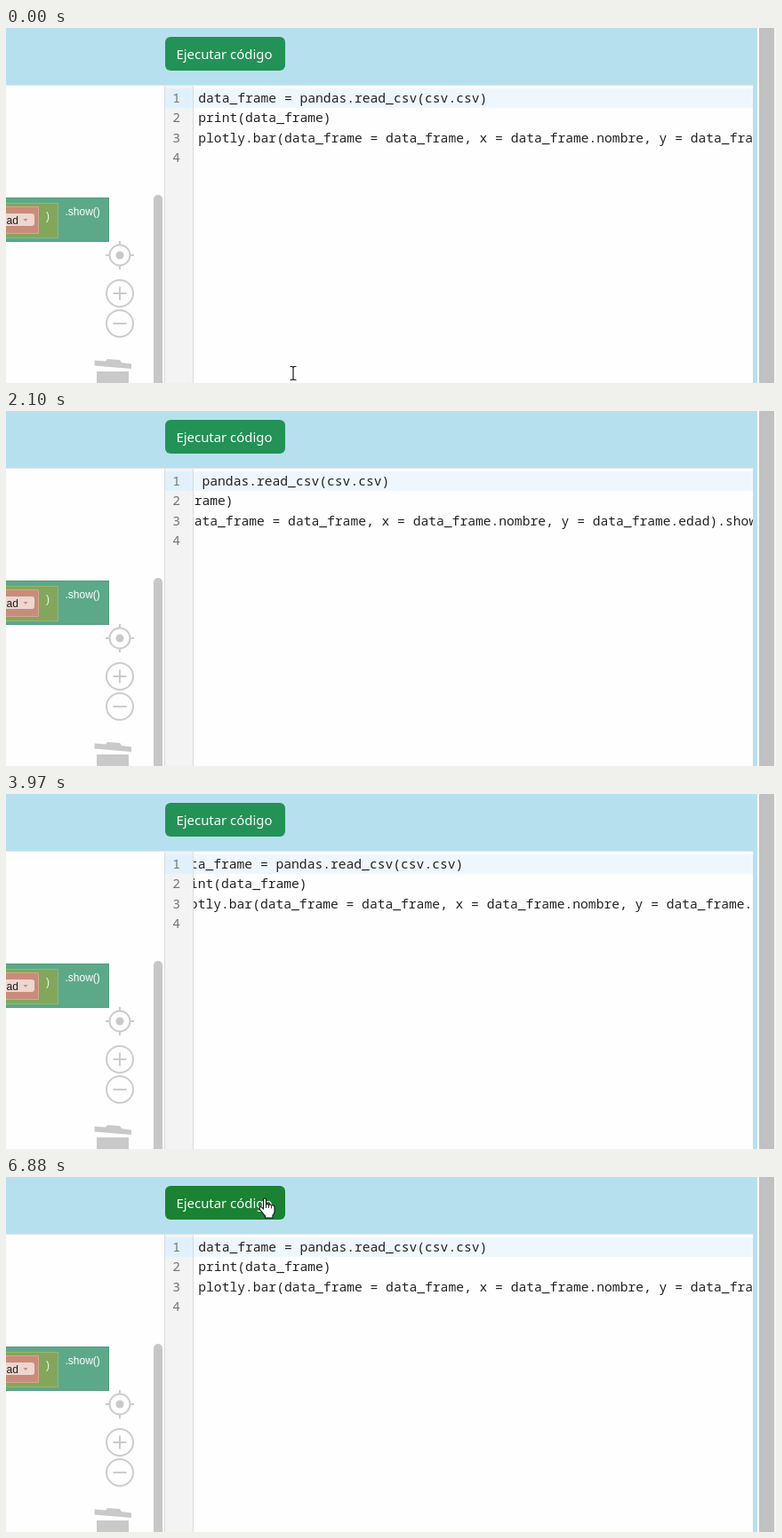
Write an HTML page that moves like this. It is 866 px wide and 400 px high and loops after 6910 ms.

```html
<!DOCTYPE html>
<html lang="es">
<head>
<meta charset="utf-8">
<title>Ejecutar código</title>
<style>
  html, body { margin: 0; width: 100%; height: 100%; overflow: hidden; background: #fefefe; }
  svg { display: block; }
  text { white-space: pre; }
  .code { font: 14.65px "Noto Sans Mono", "DejaVu Sans Mono", monospace; fill: #222; }
  .nums { fill: #757575; text-anchor: end; }
  .label { font: 14.9px "Noto Sans", "Open Sans", sans-serif; fill: #fff; }
  .block { font: 12px "Liberation Sans", Arial, sans-serif; }
  .icon { fill: none; stroke: #ccc; stroke-width: 2; }
  .solid { fill: #c9c9c9; }
</style>
</head>
<body>
<svg width="866" height="400" viewBox="0 0 866 400">
  <defs>
    <clipPath id="editor"><rect x="211" y="65" width="629" height="335"/></clipPath>
  </defs>

  <!-- page -->
  <rect width="866" height="400" fill="#fefefe"/>
  <rect width="845" height="64" fill="#b7e0ee"/>
  <rect x="840" y="64" width="5" height="336" fill="#b7e0ee"/>
  <rect y="64" width="840" height="1" fill="#dde6e8"/>
  <rect x="847" width="17" height="400" fill="#c1c1c1"/>
  <rect x="864" width="2" height="400" fill="#f6f6f6"/>

  <!-- block workspace -->
  <g class="block">
    <path d="M0 191H116V241H0Z" fill="#5ca98a"/>
    <path d="M0 191.5H115.5V240.5H0" fill="none" stroke="#539a7c"/>
    <path d="M0 197.5H58.5V236.5H0" fill="#82a75b" stroke="#98b574"/>
    <path d="M0 201.5H36.5V231.5H0" fill="#c98c7a" stroke="#d8a593"/>
    <path d="M0 209H29a3 3 0 0 1 3 3V220a3 3 0 0 1-3 3H0Z" fill="#ecd6d0"/>
    <text x="0.5" y="220.5" fill="#1c1c1c">ad</text>
    <path d="M19.5 215h5l-2.5 3z" fill="#c98c7a"/>
    <text x="45" y="216" fill="#f4f6e4">)</text>
    <text x="66.5" y="211" fill="#fff">.show()</text>
  </g>
  <g class="icon">
    <circle cx="128" cy="256" r="11.5"/>
    <path d="M128 240v5M128 267v5M112 256h5M139 256h5"/>
    <circle cx="128" cy="299" r="15"/>
    <path d="M120.5 299h15M128 291.5v15"/>
    <circle cx="128" cy="333" r="15"/>
    <path d="M120.5 333h15"/>
  </g>
  <g class="solid">
    <circle cx="128" cy="256" r="4.5"/>
    <path d="M99.5 374.5L112 375.5L114 373L128 374L130 377L141 378.5V384L99.5 380.5Z"/>
    <rect x="102" y="387" width="36" height="13"/>
    <rect x="166" y="188" width="10" height="230" rx="5" fill="#c7c7c7"/>
  </g>

  <!-- editor -->
  <g clip-path="url(#editor)">
    <rect x="211" y="68" width="629" height="22" fill="#eff7fe"/>
    <g id="code" class="code"></g>
  </g>
  <rect x="178" y="65" width="33" height="335" fill="#f3f3f3"/>
  <rect x="179" y="68" width="31" height="22" fill="#e0f1fc"/>
  <path d="M178.5 65V400M210.5 65V400" stroke="#dcdcdc"/>
  <g id="nums" class="code"></g>

  <!-- run button -->
  <rect id="run" x="179" y="10" width="135" height="38" rx="6"/>
  <text class="label" x="191.5" y="35">Ejecutar código</text>

  <!-- pointers, drawn around their hot spot -->
  <g id="beam">
    <path d="M-3.5 -7.5H-1L0 -6.5L1 -7.5H3.5M0 -6.5V6.5M-3.5 7.5H-1L0 6.5L1 7.5H3.5"
          fill="none" stroke="#1a1a1a" stroke-width="1.2"/>
  </g>
  <g id="hand">
    <path d="M-1.5 1.5Q-1.5 0 0 0T1.5 1.5V7Q3 5.5 4.5 7.5Q6.5 6 7.5 8.2Q10 7 11 9.5V15
             Q11 17.5 9 19V22H0.5V20L-5.5 12.5Q-6.5 10.5-5 9.8Q-3.5 9.5-1.5 12Z"
          fill="#fff" stroke="#111" stroke-width="1.1"/>
    <path d="M1.5 7V11M4.5 8V11M7.5 9V11.5" stroke="#111" stroke-width="0.9"/>
  </g>
</svg>
<script>
const LOOP = 6910;
const $ = id => document.getElementById(id);

const lines = [
  "data_frame = pandas.read_csv(csv.csv)",
  "print(data_frame)",
  "plotly.bar(data_frame = data_frame, x = data_frame.nombre, y = data_frame.edad).show()",
  ""
];

function addText(parent, x, y, str, cls) {
  const el = document.createElementNS("http://www.w3.org/2000/svg", "text");
  el.setAttribute("x", x);
  el.setAttribute("y", y);
  if (cls) el.setAttribute("class", cls);
  el.textContent = str;
  parent.append(el);
}

lines.forEach((line, i) => {
  const y = 84 + i * 22.4;
  addText($("code"), 216.3, y, line);
  addText($("nums"), 196, y, i + 1, "nums");
});

// Each step: time, then values reached at that time
const scrollSteps = [[0, 0], [1300, 0], [2404, 135], [3130, 135], [4308, 0]];
const pointerSteps = [
  [0, 323, 389], [300, 320, 415], [4500, 285, 415],
  [5400, 289, 309], [5700, 289, 309], [6700, 291, 24]
];

const smooth = p => p * p * (3 - 2 * p);

function valuesAt(steps, t) {
  let i = 0;
  while (i < steps.length - 1 && steps[i + 1][0] <= t) i++;
  const a = steps[i], b = steps[i + 1];
  if (!b) return a.slice(1);
  const p = smooth((t - a[0]) / (b[0] - a[0]));
  return a.slice(1).map((v, k) => v + (b[k + 1] - v) * p);
}

const HOVER_AT = 6500;
const idle = [35, 146, 86], hover = [26, 130, 50];

function draw(now) {
  const t = now % LOOP;
  const [scroll] = valuesAt(scrollSteps, t);
  const [x, y] = valuesAt(pointerSteps, t);
  const over = t >= HOVER_AT;
  const mix = Math.min(1, Math.max(0, (t - HOVER_AT) / 150));

  $("code").setAttribute("transform", `translate(${-Math.round(scroll)} 0)`);
  $("run").setAttribute("fill",
    `rgb(${idle.map((v, i) => Math.round(v + (hover[i] - v) * mix))})`);

  const place = `translate(${Math.round(x)} ${Math.round(y)})`;
  for (const [id, shown] of [["beam", !over], ["hand", over]]) {
    $(id).setAttribute("transform", place);
    $(id).setAttribute("visibility", shown ? "visible" : "hidden");
  }
}

const start = performance.now();
function tick() {
  draw(performance.now() - start);
  requestAnimationFrame(tick);
}
tick();
</script>
</body>
</html>
```
